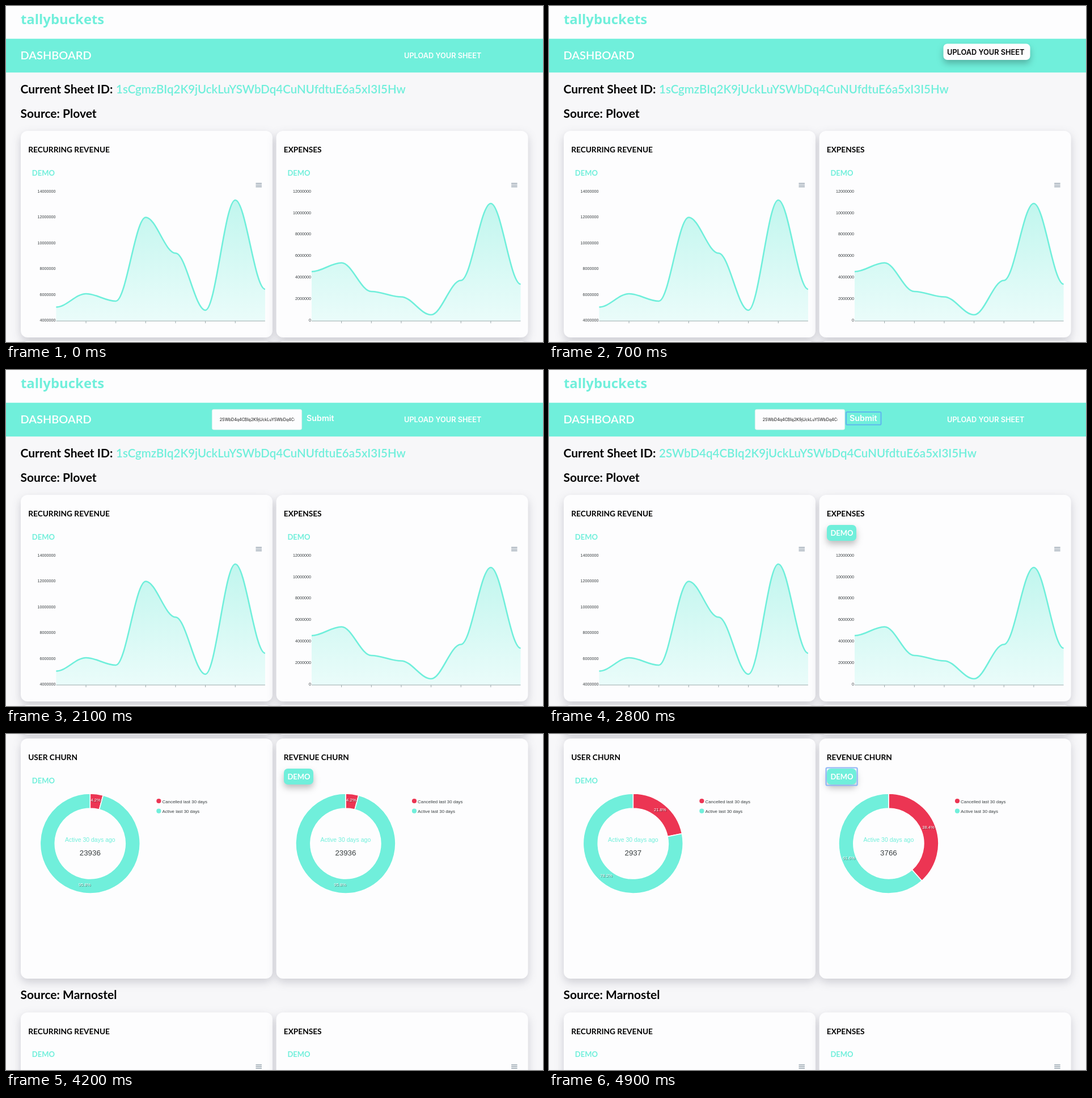
These frames come from a looping animation (947 by 592 pixels, 5.6 s). An HTML page:

```html
<!DOCTYPE html>
<html lang="en">
<head>
<meta charset="utf-8">
<title>Dashboard</title>
<style>
  html, body { margin: 0; height: 100%; overflow: hidden; background: #f7f7f9; }
  svg { display: block; width: 947px; height: 592px; }
  text { font-family: Lato, sans-serif; font-weight: 700; white-space: pre; }
  .ui { font-family: Inter, sans-serif; font-weight: 600; }
  .thin { font-family: "Liberation Sans", Arial, sans-serif; font-weight: 400; }
  .logo { font-family: "Noto Sans", sans-serif; }
  .card { fill: #fdfdfe; filter: drop-shadow(0 6px 8px rgba(40, 40, 65, .2)); }
  .lift { filter: drop-shadow(0 6px 6px rgba(0, 0, 0, .25)); }
  .percent { filter: drop-shadow(1px 1px .5px rgba(0, 0, 0, .5)); }
</style>
</head>
<body>
<svg id="stage" viewBox="0 0 947 592"></svg>
<script>
const TEAL = '#70efdb', RED = '#ec3553', INK = '#373d3f', BLUE = '#8db5f6', SKY = '#5fb8ee';
const STEP = 700, STEPS = 8;
const OLD_ID = '1sCgmzBIq2K9jUckLuYSWbDq4CuNUfdtuE6a5xI3I5Hw';
const NEW_ID = '2SWbD4q4CBIq2K9jUckLuYSWbDq4CuNUfdtuE6a5xI3I5Hw';
const LEFT = 26, RIGHT = 476.6;

const revenue = { top: 14, bottom: 4, ys: [530.5, 507, 520, 372.5, 435.5, 536, 342, 499] };
const expenses = { top: 12, bottom: 0, ys: [468, 452.5, 503, 512.5, 544, 483.5, 348, 490] };
const demoExpenses = { top: 14, bottom: 2, ys: [519, 512, 386, 349.5, 357, 405, 481.5, 424] };

const text = (x, y, size, fill, str, attrs = '') =>
  `<text x="${x}" y="${y}" font-size="${size}" fill="${fill}" ${attrs}>${str}</text>`;
const rect = (x, y, w, h, attrs) =>
  `<rect x="${x}" y="${y}" width="${w}" height="${h}" ${attrs}/>`;
const ring = (x, y, w, h, color) =>
  rect(x, y, w, h, `rx="2" fill="none" stroke="${color}" stroke-width="2.2"`);

// mode: 0 idle, 1 hovered, 2 focused
function demoButton(x, y, mode) {
  if (!mode) return text(x + 19.8, y + 78.6, 13, TEAL, 'DEMO');
  return rect(x + 13.4, y + 53, 52, 28, `rx="7" fill="${TEAL}" class="lift"`) +
    text(x + 19.8, y + 72.2, 13, '#fff', 'DEMO') +
    (mode > 1 ? ring(x + 12, y + 51.5, 55, 31, BLUE) : '');
}

function card(x, y, height, title, mode = 0) {
  return rect(x, y, 444, height, 'rx="12" class="card"') +
    text(x + 13.2, y + 38, 13.7, '#000', title) + demoButton(x, y, mode);
}

const menu = (x, y) => [92.5, 95.5, 98.5].map(d =>
  rect(x + 414.5, y + d - .6, 10.5, 1.2, 'fill="#7b8b99"')).join('');

function areaChart(x0, { top, bottom, ys }) {
  const gap = 52.65, reach = gap * .35, x = i => x0 + 62.4 + i * gap;
  let line = `M${x(0)} ${ys[0]}`, out = '';
  for (let i = 1; i < ys.length; i++)
    line += `C${x(i - 1) + reach} ${ys[i - 1]} ${x(i) - reach} ${ys[i]} ${x(i)} ${ys[i]}`;
  out += `<path d="${line}V555H${x(0)}Z" fill="url(#area)"/>`;
  out += `<path d="${line}" fill="none" stroke="${TEAL}" stroke-width="2.6"/>`;
  let axis = `M${x(0)} 555H${x(7)}`;
  for (let i = 1; i < 7; i++) axis += `M${x(i)} 555v4`;
  out += `<path d="${axis}" fill="none" stroke="#9aa9ab"/>`;
  const count = (top - bottom) / 2;
  for (let i = 0; i <= count; i++) {
    const value = (top - 2 * i) * 1e6;
    out += text(x0 + 61.4, 328.7 + i * 227.3 / count, 7.2, INK, value, 'class="thin" text-anchor="end"');
  }
  return out + menu(x0, 220);
}

function donut(x0, y0, total, share) {
  const cx = x0 + 122.3, cy = y0 + 185, outer = 88, inner = 62;
  const at = (r, part) => {
    const a = part * 2 * Math.PI;
    return [cx + r * Math.sin(a), cy - r * Math.cos(a)];
  };
  const slice = (from, to, fill) => {
    const big = +(to - from > .5);
    return `<path d="M${at(outer, from)}A${outer} ${outer} 0 ${big} 1 ${at(outer, to)}` +
      `L${at(inner, to)}A${inner} ${inner} 0 ${big} 0 ${at(inner, from)}Z" ` +
      `fill="${fill}" stroke="#fff" stroke-width="1.6"/>`;
  };
  const label = (part, value) => {
    const [x, y] = at(75, part);
    return text(x, y + .8, 7.6, '#fff', (value * 100).toFixed(1) + '%',
      'class="thin percent" text-anchor="middle"');
  };
  const legend = (y, fill, str) =>
    `<circle cx="${x0 + 243.4}" cy="${y}" r="4.1" fill="${fill}"/>` +
    text(x0 + 249.5, y + 3.6, 7.9, INK, str, 'class="thin"');
  const middle = 'class="thin" text-anchor="middle"';
  return slice(0, share, RED) + slice(share, 1, TEAL) +
    label(share / 2, share) + label((1 + share) / 2, 1 - share) +
    text(cx, y0 + 182, 10.5, TEAL, 'Active 30 days ago', middle) +
    text(cx, y0 + 206, 13.3, INK, total, middle) +
    legend(y0 + 110, RED, 'Cancelled last 30 days') +
    legend(y0 + 127.7, TEAL, 'Active last 30 days');
}

function uploadButton(mode) {
  if (!mode) return text(702, 92.1, 12.75, '#fff', 'UPLOAD YOUR SHEET', 'class="ui"');
  return rect(695.5, 66.5, 153, 28.5, 'rx="7" fill="#fdfdfe" class="lift"') +
    (mode > 1 ? ring(694.7, 65.5, 154.6, 31, SKY) : '') +
    text(702, 85.6, 12.75, '#000', 'UPLOAD YOUR SHEET', 'class="ui"');
}

function sheetForm(step) {
  const filled = step >= 3;
  return rect(363.3, 69.3, 158.4, 36, 'rx="3" fill="#fdfdfe" stroke="#d5e9e6" stroke-width=".6"') +
    `<g clip-path="url(#field)">` +
    text(376.8, 90, 7.1, filled ? '#111' : '#777', filled ? NEW_ID : 'Zumbel Sheet ID',
      'class="ui" style="font-weight:400"') + '</g>' +
    text(530, 90.3, 14.3, '#fff', 'Submit', 'class="ui"') +
    (step === 4 ? ring(524, 74, 61.5, 22.5, SKY) : '');
}

function topView(step) {
  const hover = Math.max(0, step - 3);
  return rect(0, 0, 947, 58, 'fill="#fdfdfe"') + rect(0, 57.7, 947, 59.5, `fill="${TEAL}"`) +
    text(26, 32, 23.9, TEAL, 'tallybuckets', 'class="logo"') +
    text(25.5, 93.8, 20, '#fff', 'DASHBOARD', 'style="font-weight:600"') +
    uploadButton(step < 3 ? step : 0) +
    (step >= 2 ? sheetForm(step) : '') +
    text(25.5, 153.6, 21, '#000', 'Current Sheet ID:') +
    text(194, 153.6, 20.5, TEAL, step >= 4 ? NEW_ID : OLD_ID, 'style="font-weight:600"') +
    text(25.5, 197, 21, '#000', 'Source: Plovet') +
    card(LEFT, 220, 364, 'RECURRING REVENUE') + card(RIGHT, 220, 364, 'EXPENSES', hover) +
    areaChart(LEFT, revenue) + areaChart(RIGHT, step >= 5 ? demoExpenses : expenses) +
    card(LEFT, 590.5, 423, 'USER CHURN') + card(RIGHT, 590.5, 423, 'REVENUE CHURN');
}

function churnView(focused) {
  return card(LEFT, -363, 364, '') + card(RIGHT, -363, 364, '') +
    card(LEFT, 8, 423, 'USER CHURN') + card(RIGHT, 8, 423, 'REVENUE CHURN', focused ? 2 : 1) +
    donut(LEFT, 8, focused ? 2937 : 23936, focused ? .218 : .042) +
    donut(RIGHT, 8, focused ? 3766 : 23936, focused ? .384 : .042) +
    text(25.5, 467.3, 21, '#000', 'Source: Marnostel') +
    card(LEFT, 490.5, 364, 'RECURRING REVENUE') + card(RIGHT, 490.5, 364, 'EXPENSES') +
    menu(LEFT, 490.5) + menu(RIGHT, 490.5);
}

const defs = `<defs>
  <linearGradient id="area" x2="0" y2="1">
    <stop stop-color="#c1f6ee"/><stop offset="1" stop-color="#eafcfa"/>
  </linearGradient>
  <clipPath id="field">${rect(376, 75, 132.5, 25, '')}</clipPath>
</defs>`;

const stage = document.getElementById('stage');
let shown = -1;
function draw() {
  const step = Math.floor(performance.now() / STEP) % STEPS;
  if (step !== shown) {
    shown = step;
    stage.innerHTML = defs + (step < 6 ? topView(step) : churnView(step === 7));
  }
  requestAnimationFrame(draw);
}
draw();
</script>
</body>
</html>
```
